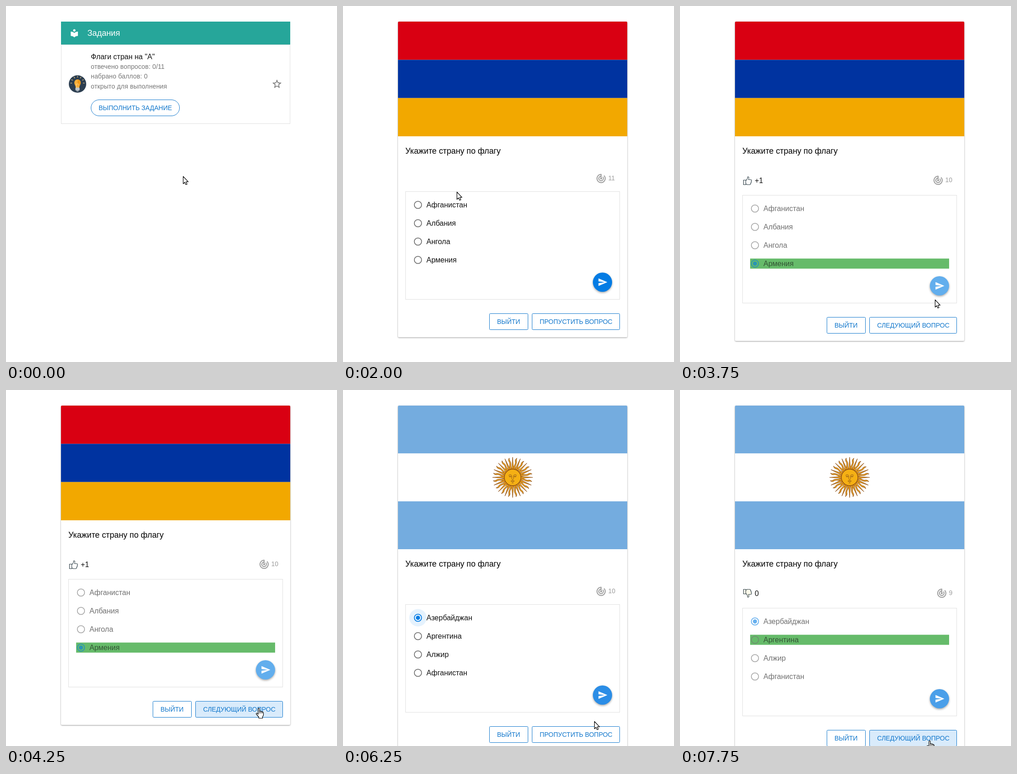
An HTML page for the animation above (8000 ms loop, 722x776 px).

```html
<!DOCTYPE html>
<html lang="ru">
<meta charset="utf-8">
<style>
  html, body { margin: 0; width: 100%; height: 100%; overflow: hidden; background: #fff; }
  svg { display: block; }
  text { font-family: "Liberation Sans", Arial, sans-serif; white-space: pre; }
  .card { filter: drop-shadow(0 1px 1.5px rgba(0,0,0,.4)); }
  .fab { filter: drop-shadow(0 2px 2px rgba(0,0,0,.35)); }
</style>
<svg id="stage" width="722" height="776" viewBox="0 0 722 776"></svg>
<script>
const stage = document.getElementById('stage');
const LOOP = 8000, STEP = 250;
const BLUE = '#047ce4', LINK = '#1177cc', GREY = '#757575';

// Pointer: time, x, y, is hand
const pointer = [
  [0, 386, 371, 0], [250, 332, 262, 0], [500, 290, 218, 1], [1000, 289, 220, 0],
  [1500, 285, 250, 0], [1750, 268, 325, 0], [2000, 248, 405, 0], [2250, 232, 472, 1],
  [2500, 220, 526, 1], [2750, 220, 546, 1], [3000, 304, 576, 0], [3250, 500, 602, 0],
  [3500, 558, 601, 1], [3750, 556, 640, 0], [4000, 550, 690, 1], [4250, 545, 693, 1],
  [4750, 470, 620, 0], [5000, 330, 552, 0], [5250, 250, 528, 1], [5500, 222, 500, 1],
  [5750, 222, 495, 1], [6000, 557, 662, 1], [6250, 548, 722, 0], [7250, 546, 728, 0],
  [7500, 545, 734, 0], [7750, 538, 764, 1]
];

const icons = {
  reader: 'M12 11.55C9.64 9.35 6.48 8 3 8v11c3.48 0 6.64 1.35 9 3.55 2.36-2.19 5.52-3.55 9-3.55V8c-3.48 0-6.64 1.35-9 3.55zM12 8c1.66 0 3-1.34 3-3s-1.34-3-3-3-3 1.34-3 3 1.34 3 3 3z',
  star: 'M22 9.24l-7.19-.62L12 2 9.19 8.63 2 9.24l5.46 4.73L5.82 21 12 17.27 18.18 21l-1.63-7.03zM12 15.4l-3.76 2.27 1-4.28-3.32-2.88 4.38-.38L12 6.1l1.71 4.04 4.38.38-3.32 2.88 1 4.28z',
  target: 'M19.07 4.93l-1.41 1.41A8 8 0 1 1 11 4.07v2.02A6 6 0 1 0 16.24 7.76l-1.41 1.41A4 4 0 1 1 11 8.14v2.14a2 2 0 1 0 2 0V2h-1a10 10 0 1 0 7.07 2.93z',
  send: 'M2.01 21L23 12 2.01 3 2 10l15 2-15 2z',
  thumb: 'M1 9h5v10H1zM6 10c3-2 4-5 4-8 2-1 4 1 2 6h5c2 0 2 3 .5 3 1.5.5 1 3-.5 3 1 .5.5 2.500-1 2.500 .5 1 0 2.500-1 2.500H9L6 17',
  arrow: 'M.5 .5V16.500L4 13.200 6.300 18.500 9 17.500 6.700 12.200H11.500Z',
  hand: 'M5 14V2.500C5 0 8 0 8 2.500V8C8 6 11 6.500 11 8.500 11 7 14 7.500 14 9.500 14 8 16.500 8.500 16.500 11V16L14.500 19.500V22.500H6.500V20L1 13.500C0 11.500 2 10.500 3.500 12Z'
};

const text = (x, y, s, size = 16, fill = '#111', extra = '') =>
  `<text x="${x}" y="${y}" font-size="${size}" fill="${fill}" ${extra}>${s}</text>`;
const rect = (x, y, w, h, fill, extra = '') =>
  `<rect x="${x}" y="${y}" width="${w}" height="${h}" fill="${fill}" ${extra}/>`;
const circle = (x, y, r, fill, extra = '') =>
  `<circle cx="${x}" cy="${y}" r="${r}" fill="${fill}" ${extra}/>`;
const icon = (name, x, y, fill, scale = 1, extra = '') =>
  `<path d="${icons[name]}" fill="${fill}" transform="translate(${x} ${y}) scale(${scale})" ${extra}/>`;
const line = (d, color, width, extra = '') =>
  `<path d="${d}" fill="none" stroke="${color}" stroke-width="${width}" ${extra}/>`;

function button(x, y, w, label, fill = '#fff', rx = 2) {
  return rect(x + .5, y + .5, w - 1, 35, fill, `rx="${rx}" stroke="${LINK}"`) +
    text(x + 17, y + 22.500, label, 14, LINK);
}

function bulb() {
  let s = circle(156, 170, 19, '#2c3e50');
  for (let a = -90; a <= 90; a += 30)
    s += line('M0 -12V-15.500', '#e8c98a', 1.2, `transform="translate(156 168) rotate(${a})"`);
  return s +
    '<path d="M152 178C152 173 149 171 149 167A7 7 0 0 1 163 167C163 171 160 173 160 178Z" fill="#fbb03b"/>' +
    '<path d="M156 160A7 7 0 0 1 163 167C163 171 160 173 160 178H156Z" fill="#f09a1a"/>' +
    line('M154.500 178L153.500 170H158.500L157.500 178', '#fde3a8', .8) +
    rect(151.500, 178, 9, 6, '#cfd5da', 'rx="1"') + rect(153.500, 184, 5, 2.500, '#8d99a3', 'rx="1"') +
    line('M151.500 180H160.500M151.500 182.500H160.500', '#8d99a3', .7);
}

function taskList(t) {
  const sub = (y, s) => text(185, y, s, 14, GREY, 'letter-spacing=".15"');
  return rect(120.5, 84.5, 499, 172, '#fff', 'stroke="#e0e0e0"') +
    rect(120, 34, 500, 50, '#26a69a') +
    icon('reader', 138.600, 48.800, '#fff', .87) +
    text(177.500, 65, 'Задания', 18, '#fff') +
    bulb() +
    text(185, 116, 'Флаги стран на "А"') +
    sub(137, 'отвечено вопросов: 0/11') +
    sub(158, 'набрано баллов: 0') +
    sub(180, 'открыто для выполнения') +
    icon('star', 579, 158, GREY) +
    button(185, 204, 194, 'ВЫПОЛНИТЬ ЗАДАНИЕ', t >= 500 ? '#d9ebfb' : '#fff', 17.5);
}

function sun(x, y) {
  const ray = ['M-2.200 -17L0 -44L2.200 -17Z',
    'M-2 -17C-4 -26 2 -29 -1.500 -36Q-2.500 -40 1 -43Q0 -39 1.500 -36C4 -30 -1 -26 2 -17Z'];
  let s = `<g transform="translate(${x} ${y})">`;
  for (let i = 0; i < 32; i++)
    s += `<path d="${ray[i % 2]}" fill="#e8a020" stroke="#8a4a14" stroke-width=".8" transform="rotate(${i * 11.25})"/>`;
  return s + circle(0, 0, 18, '#f5b014', 'stroke="#8a4a14" stroke-width="1.300"') +
    line('M-9 -4Q-5 -8 -2 -4V3M9 -4Q5 -8 2 -4V3M-8 -2Q-5 -4 -3 -2Q-5 0 -8 -2M8 -2Q5 -4 3 -2Q5 0 8 -2M-2 4Q0 6 2 4M-4 8Q0 6 4 8Q0 11 -4 8M-2 12H2', '#85501a', .9) +
    '</g>';
}

const quizzes = [
  { height: 250, colors: ['#d90012', '#0033a0', '#f2a800'], left: 11,
    options: ['Афганистан', 'Албания', 'Ангола', 'Армения'],
    right: 3, pick: 3, pickAt: 2750, sendAt: 3500, doneAt: 3750, hoverAt: 4000 },
  { height: 313, colors: ['#74acdf', '#fff', '#74acdf'], left: 10, emblem: true,
    options: ['Азербайджан', 'Аргентина', 'Алжир', 'Афганистан'],
    right: 1, pick: 0, pickAt: 5750, sendAt: 6250, doneAt: 7000, hoverAt: 7750 }
];

function option(q, i, y, t) {
  const done = t >= q.doneAt, picked = i === q.pick && t >= q.pickAt;
  let s = '';
  if (done && i === q.right) s += rect(153, y - 11, 434, 22, '#66bb6a');
  if (picked && !done) {
    const fresh = t - q.pickAt < 500;
    s += circle(163.5, y, fresh ? 15 : 19, BLUE, `opacity="${fresh ? .36 : .1}"`);
  }
  const color = picked ? BLUE : GREY;
  s += `<g opacity="${done ? .6 : 1}">` +
    circle(163.5, y, 7.9, 'none', `stroke="${color}" stroke-width="1.800"`) +
    (picked ? circle(163.5, y, 4.5, BLUE) : '') +
    text(182, y + 5.5, q.options[i]) + '</g>';
  return s;
}

function thumb(up, y) {
  const flip = up ? '' : 'translate(0 20) scale(1 -1)';
  return `<g transform="translate(137.500 ${y}) ${flip}">` +
    icon('thumb', 0, 0, up ? '#fff' : '#fffbea', 1, 'stroke="#37474f" stroke-width="1.200" stroke-linejoin="round"') + '</g>';
}

function quiz(q, t) {
  const b = 34 + q.height, done = t >= q.doneAt, d = done ? 8 : 0;
  const stripe = q.height / 3, won = q.pick === q.right;
  let s = rect(120, 34, 500, q.height + 438 + d, '#fff', 'rx="2" class="card"');
  s += '<clipPath id="round"><rect x="120" y="34" width="500" height="400" rx="2"/></clipPath><g clip-path="url(#round)">';
  q.colors.forEach((c, i) => s += rect(120, 34 + i * stripe, 500, stripe, c));
  s += '</g>';
  if (q.emblem) s += sun(370, 190.5);
  s += text(136, b + 38, 'Укажите страну по флагу', 17.8, '#000');

  const left = q.left - (done ? 1 : 0), shift = left < 10 ? 8 : 0;
  s += icon('target', 551 + shift, b + 80 + d / 2, '#9e9e9e') +
    text(578.500 + shift, b + 96 + d / 2, left, 14, '#9e9e9e');
  if (done) s += thumb(won, b + 86.500) + text(163, b + 102, won ? '+1' : '0');

  const top = b + d;
  s += rect(136.5, top + 120.5, 467, 235, '#fff', 'stroke="#e0e0e0"');
  q.options.forEach((_, i) => s += option(q, i, top + 149.5 + 40 * i, t));

  const fab = done ? (won ? '#62aeed' : t >= 7750 ? '#4b9fe9' : '#429ae8') : t >= q.sendAt ? '#2b8de6' : BLUE;
  s += circle(566, top + 318, 21, fab, 'class="fab"') +
    icon('send', 555.500, top + 307, '#fff', .92);
  s += button(319 + d / 8, top + 386, 85, 'ВЫЙТИ');
  s += done
    ? button(413, top + 386, 191, 'СЛЕДУЮЩИЙ ВОПРОС', t >= q.hoverAt ? '#d9ebfb' : '#fff')
    : button(412, top + 386, 192, 'ПРОПУСТИТЬ ВОПРОС');
  return s;
}

function cursor(t) {
  const [, x, y, hand] = pointer.findLast(p => p[0] <= t);
  const outline = 'stroke="#000" stroke-width="1.200" stroke-linejoin="round"';
  return hand
    ? icon('hand', x, y, '#fff', 1, outline) + line(`M${x + 8} ${y + 8}v4m3 -3v3m3 -2v2`, '#000', 1)
    : icon('arrow', x, y, '#fff', 1, outline);
}

let shown = -1;
function frame(now) {
  const t = Math.floor(now % LOOP / STEP) * STEP;
  if (t !== shown) {
    shown = t;
    stage.innerHTML = (t < 1000 ? taskList(t) : quiz(quizzes[t < 4750 ? 0 : 1], t)) + cursor(t);
  }
  requestAnimationFrame(frame);
}
frame(performance.now());
</script>
</html>
```
